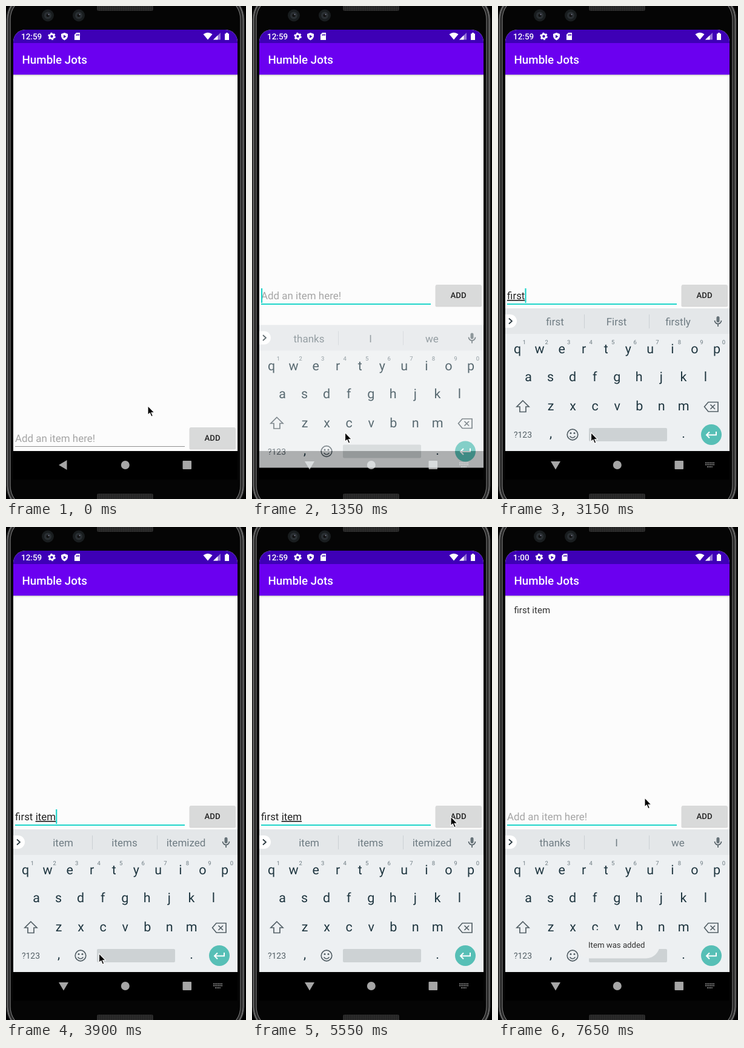
Animation of 396 by 812 pixels, one loop 8 s. Source, as an HTML page:

```html
<!DOCTYPE html>
<html lang="en">
<head>
<meta charset="utf-8">
<title>To-do app</title>
<style>
  html, body { margin: 0; width: 100%; height: 100%; overflow: hidden; background: #000; }
  svg { display: block; width: 100%; height: 100%; font-family: Roboto, sans-serif; }
  text { white-space: pre; text-rendering: geometricPrecision; }
  .mid { text-anchor: middle; }
  .line { fill: none; stroke: #546067; stroke-width: 1.7; }
  #keys { font-size: 21.5px; fill: #1f3640; }
  #keys .digit { font-size: 9.5px; fill: #6d7b82; }
  #words { font-size: 17px; fill: #6f7c83; }
  #typed { font-size: 16.95px; fill: #222; }
</style>
</head>
<body>
<svg viewBox="0 0 396 812">
  <defs>
    <clipPath id="screen"><path d="M12 780V59a20 20 0 0 1 20-20H362a20 20 0 0 1 20 20V780Z"/></clipPath>
    <pattern id="mesh" width="3" height="3" patternUnits="userSpaceOnUse">
      <path d="M0 0H3V3H0Z" fill="#202020"/><circle cx="1.5" cy="1.5" r=".9" fill="#3d3d3d"/>
    </pattern>
    <linearGradient id="shade" x2="0" y2="1"><stop stop-color="#c8c8c8"/><stop offset="1" stop-color="#fcfcfc"/></linearGradient>
  </defs>

  <!-- phone body -->
  <g fill="none">
    <rect x=".5" y="-22" width="393" height="856" rx="44" fill="#050505" stroke="#2a2a2a"/>
    <rect x="2.5" y="-20" width="389" height="852" rx="42" stroke="#8a8a8a" stroke-width="1.5"/>
    <rect x="4.500" y="-18" width="385" height="848" rx="40" stroke="#363636" stroke-width="2"/>
    <rect x="7" y="-16" width="380" height="844" rx="38" stroke="#808080" stroke-width="1.2"/>
  </g>
  <rect x="150" y="-4" width="93" height="12" rx="3" fill="url(#mesh)"/>
  <rect x="150" y="803" width="93" height="14" rx="3" fill="url(#mesh)"/>
  <g id="lenses"></g>

  <g clip-path="url(#screen)">
    <path d="M12 39H382V733H12Z" fill="#fcfcfc"/>
    <path d="M12 39H382V61H12Z" fill="#3e00b6"/>
    <path d="M12 61H382V113H12Z" fill="#6b00f0"/>
    <path d="M12 113H382V116H12Z" fill="url(#shade)"/>
    <text x="26.500" y="95" font-size="18.800" font-weight="500" fill="#fff">Humble Jots</text>

    <!-- status bar -->
    <g fill="#fff">
      <text id="clock" x="25" y="55" font-size="13.500" font-weight="500"></text>
      <g id="notices">
        <circle cx="75.500" cy="50" r="3.600" fill="none" stroke="#fff" stroke-width="2.800"/>
        <circle cx="75.500" cy="50" r="5.400" fill="none" stroke="#fff" stroke-width="1.800" stroke-dasharray="2.830"/>
        <path d="M96.500 44L102 46V50Q101 54.500 96.500 56.500Q92 54.500 91 50V46ZM95 47.500V53L99.500 50.200Z" fill-rule="evenodd"/>
        <path d="M116 44H122V56H113V47ZM115.500 46.500V49H116.700V46.500ZM117.500 46V49H118.700V46ZM119.500 46V49H120.700V46Z" fill-rule="evenodd"/>
      </g>
      <path d="M325.500 46.500Q333 41 340.500 46.500L333 55.500Z"/>
      <path d="M342 55.500L354 44V55.500Z" opacity=".45"/>
      <path d="M342 55.500L349.500 48.300V55.500Z"/>
      <path d="M361 45.500H363V44H366V45.500H368V56H361Z"/>
    </g>

    <text id="item" x="26.500" y="142" font-size="15.060" fill="#333">first item</text>

    <!-- entry row -->
    <g id="row">
      <text id="hint" x="15" y="483" font-size="16.950" fill="#a5a5a5">Add an item here!</text>
      <text id="typed" x="15" y="483"><tspan id="done"></tspan><tspan id="draft" text-decoration="underline"></tspan></text>
      <rect id="underline" x="15" width="280"/>
      <rect id="caret" y="465" width="2.200" height="24" fill="#1fd5cb"/>
      <rect x="302.500" y="460" width="76.500" height="35.500" rx="2" fill="#c9c9c9" opacity=".7"/>
      <rect id="button" x="303" y="459" width="75.500" height="34.500" rx="2"/>
      <text class="mid" x="340.500" y="481" font-size="13.200" font-weight="500" fill="#222">ADD</text>
    </g>

    <!-- navigation bar -->
    <path d="M12 733H382V780H12Z"/>
    <g fill="#a6a6a6">
      <path id="back"/>
      <circle cx="196.800" cy="756" r="7"/>
      <rect x="291.500" y="749" width="14.500" height="14" rx="1"/>
      <path id="imeIcon" d="M342 752.500H357M342 755.500H357M345 759H354" stroke="#a6a6a6" stroke-width="1.700" stroke-dasharray="1.800 .85"/>
    </g>

    <!-- keyboard -->
    <g id="keyboard">
      <path d="M12 498H382V733H12Z" fill="#edf0f2"/>
      <path d="M12 498H382V540H12Z" fill="#e4e7e9"/>
      <path d="M142.500 508V531M249.500 508V531" stroke="#cbd0d3"/>
      <path d="M12 508H20a11 11 0 0 1 0 22H12Z" fill="#fff"/>
      <path class="line" d="M18 514.500L23 519L18 523.500" style="stroke:#26353c"/>
      <g id="words"></g>
      <rect x="360.500" y="511" width="5" height="10" rx="2.500" fill="#667278"/>
      <path class="line" d="M357.500 518a5.500 5.500 0 0 0 11 0M363 523.500V528"/>
      <g id="keys"></g>
      <path class="line" d="M41 650L51 660H46V668.500H36V660H31Z"/>
      <path class="line" d="M340.500 660L347 652.500H363V668H347ZM350.500 656.500L358 664M358 656.500L350.500 664"/>
      <circle class="line" cx="123" cy="706" r="8.800"/>
      <path class="line" d="M118.500 708.500Q123 714 127.500 708.500"/>
      <circle cx="120" cy="703.500" r="1.500" fill="#546067"/><circle cx="126" cy="703.500" r="1.500" fill="#546067"/>
      <rect x="150" y="695" width="129" height="22" rx="2" fill="#cdd2d4"/>
      <circle cx="352" cy="706" r="17" fill="#57bfb6"/>
      <path class="line" d="M360 701V706.500H344.500M349 701.500L344 706.500L349 711.500" style="stroke:#fff;stroke-width:2"/>
    </g>

    <g id="toast">
      <rect x="127" y="664" width="140" height="46.500" rx="23" fill="#eef0f1"/>
      <text x="149" y="693" font-size="13.200" fill="#333">Item was added</text>
    </g>
  </g>

  <path id="pointer" d="M0 0V15L3.400 12L5.800 17.800L8.400 16.700L6 11.200H10.800Z" stroke="#fff" stroke-width="1.100"/>
</svg>

<script>
const $ = id => document.getElementById(id);
const LOOP = 8000, STEP = 150, PITCH = 36.55;
const label = (str, x, y, extra = '') => `<text class="mid ${extra}" x="${x}" y="${y}">${str}</text>`;

$('lenses').innerHTML = [69, 120].map(x => `
  <circle cx="${x}" cy="15.500" r="10" fill="#191d1f"/>
  <circle cx="${x}" cy="15.500" r="6" fill="#2a2f33"/>
  <circle cx="${x}" cy="15.500" r="2.500" fill="#111"/>
  <circle cx="${x + 1.5}" cy="14" r="1.200" fill="#667"/>`).join('');

const keyRow = (letters, x, y) => [...letters].map((c, i) => label(c, x + i * PITCH, y)).join('');
$('keys').innerHTML =
  keyRow('qwertyuiop', 32, 572) + keyRow('asdfghjkl', 50, 618) + keyRow('zxcvbnm', 87, 666) +
  [...'1234567890'].map((c, i) => label(c, 43.5 + i * PITCH, 556.5, 'digit')).join('') +
  label(',', 87, 711) + label('.', 306, 711) +
  '<text class="mid" x="41" y="711" style="font-size:14px;fill:#546067">?123</text>';

// [time, committed text, word being typed, suggestions]
const typing = [
  [0, '', '', 'thanks|I|we'],
  [2700, '', 'f', 'for|f|from'],
  [2850, '', 'fi', 'find|fi|fine'],
  [3000, '', 'firs', 'first|firs|firstly'],
  [3150, '', 'first', 'first|First|firstly'],
  [3300, 'first ', '', 'time|of|day'],
  [3600, 'first ', 'i', 'in|is|it'],
  [3750, 'first ', 'ite', 'item|items|itemized'],
  [3900, 'first ', 'item', 'item|items|itemized'],
  [6000, '', '', 'thanks|I|we']
];
const caretOn = [[1050, 1800], [2250, 4350], [4950, 5400], [5850, 6600], [7050, 7650]];
const pointerPath = [
  [0, 234, 658.5], [150, 232, 650], [300, 225, 632], [450, 200, 682], [600, 175, 725], [900, 153.500, 702.5],
  [4800, 153.500, 702.5], [4950, 170, 680], [5250, 275, 540], [5400, 315, 492], [5550, 328, 477],
  [6450, 328, 477], [6600, 320, 470], [6750, 293, 457], [6900, 255, 448], [7050, 242, 446]
];
const toastFade = [[6000, 0], [6150, .12], [6300, .5], [6450, .88], [6600, 1]];
const keyboardIn = [[1200, 0, 28], [1350, .73, 27.5], [1500, 1, 0]];

// Linear interpolation along [time, ...values] keyframes.
function track(keys, t) {
  const i = keys.findIndex(k => k[0] > t);
  if (i === 0) return keys[0].slice(1);
  if (i < 0) return keys[keys.length - 1].slice(1);
  const a = keys[i - 1], b = keys[i], p = (t - a[0]) / (b[0] - a[0]);
  return a.slice(1).map((v, j) => v + (b[j + 1] - v) * p);
}

const set = (id, attrs) => { for (const k in attrs) $(id).setAttribute(k, attrs[k]); };
const show = (id, on) => set(id, { visibility: on ? 'visible' : 'hidden' });
const move = (id, x, y) => set(id, { transform: `translate(${x} ${y})` });

function render(t) {
  const focused = t >= 1050, raised = t >= 1200, late = t >= 6900;
  $('clock').textContent = late ? '1:00' : '12:59';
  move('notices', late ? -7.5 : 0, 0);
  show('item', t >= 6000);

  const [, done, draft, words] = typing.filter(s => s[0] <= t).pop();
  $('done').textContent = done;
  $('draft').textContent = draft;
  $('words').innerHTML = words.split('|').map((w, i) => label(w, [94, 195.5, 297][i], 526)).join('');
  const typed = done + draft;
  show('hint', !typed);
  show('caret', caretOn.some(([from, to]) => t >= from && t < to));
  set('caret', { x: 15 + (typed ? $('typed').getComputedTextLength() : 0) });

  move('row', 0, raised ? 0 : 235);
  set('underline', focused ? { y: 490, height: 2, fill: '#1fd5cb' } : { y: 490, height: 1, fill: '#8f8f8f' });
  set('button', { fill: t >= 5850 && t < 6150 ? '#c5c6c6' : t >= 6150 && t < 6300 ? '#cfd0d0' : '#d9dada' });

  set('back', { d: raised ? 'M87 750H103L95 763.500Z' : 'M87 756L100.500 748V764Z' });
  show('imeIcon', raised);
  const [alpha, drop] = track(keyboardIn, t);
  set('keyboard', { opacity: alpha });
  move('keyboard', 0, drop);

  set('toast', { opacity: track(toastFade, t)[0] });
  move('pointer', ...track(pointerPath, t));
}

function tick() {
  const t = performance.now() % LOOP;
  render(Math.floor(t / STEP) * STEP);
  requestAnimationFrame(tick);
}
tick();
</script>
</body>
</html>
```
